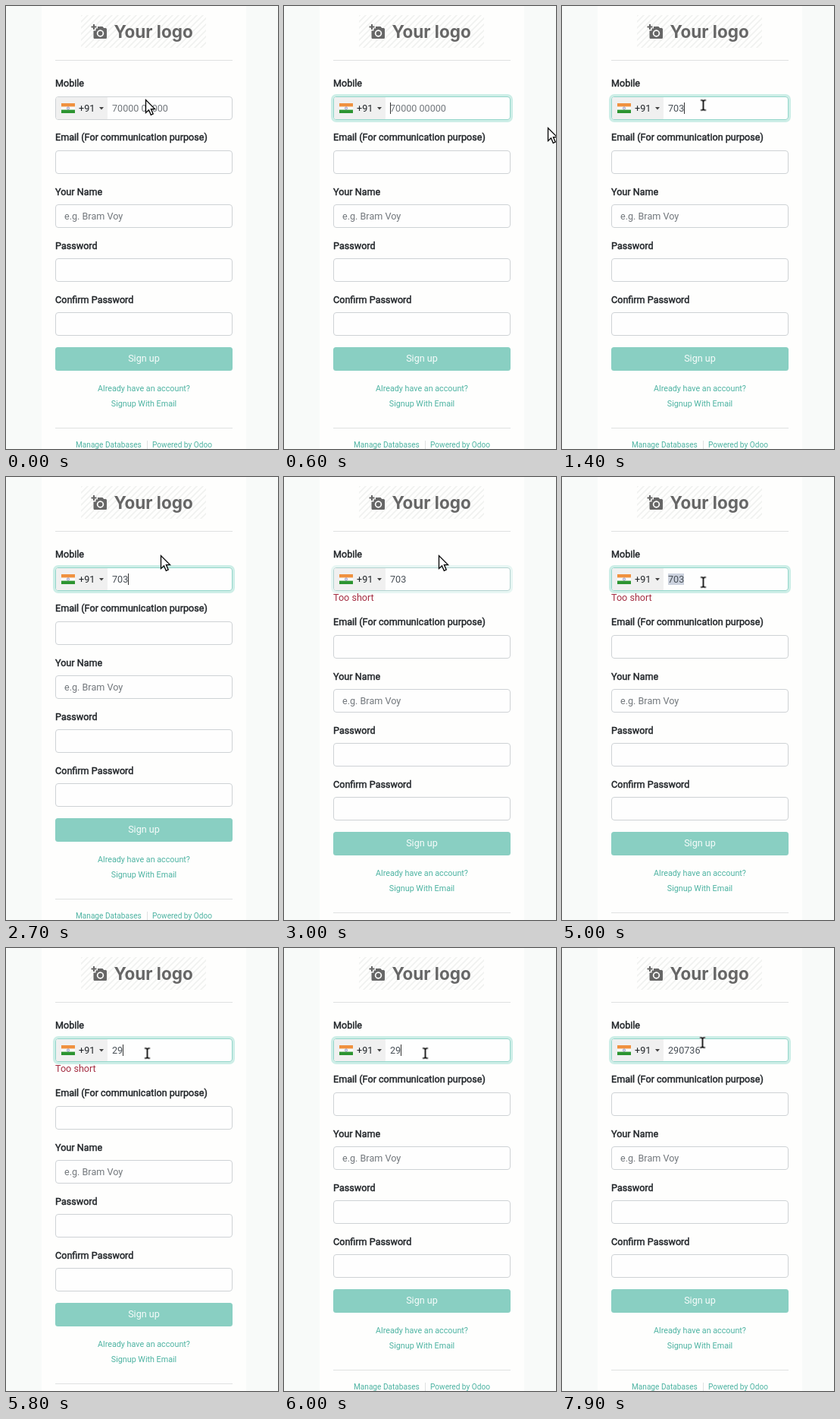
Write an HTML page that moves like this. It is 359x583 px and loops after 8 s.

```html
<!DOCTYPE html>
<html lang="en">
<head>
<meta charset="utf-8">
<title>Sign up form</title>
<style>
html, body { margin: 0; width: 100%; height: 100%; overflow: hidden; background: #f8faf9; }
body { position: relative; font: 12.6px Roboto, sans-serif; }
svg { position: absolute; left: 0; top: 0; width: 359px; height: 583px; }

.label { fill: #212529; stroke: #212529; stroke-width: .45px; }
.field { x: 65.5px; width: 233px; height: 30px; rx: 3.5px; fill: #fefefe; stroke: #ced2d5; }
.hint { fill: #72777c; }
.mid { text-anchor: middle; }
.link { fill: #4db3a2; font-size: 10.75px; }
.foot { fill: #4db3a2; font-size: 10.1px; }
.rule { stroke: #dfe1e1; }
.brand { font: 700 22.5px Inter, sans-serif; fill: #666; }

.entry { position: absolute; left: 140px; top: 127px; height: 15px; line-height: 15px; display: flex; color: #495057; }
.entry span { display: block; width: 0; overflow: hidden; white-space: nowrap; }
.entry i { width: 1px; height: 15px; background: #333; }

/* One 8 s clock, 1.25% per 100 ms */
.rest, .error, .ring, .placeholder, .first, .second, .caret, .pointer, .arrow, .beam {
  animation: 8s step-end -20ms infinite;
}
.rest { animation-name: push; }
.error { animation-name: warn; fill: #a52f43; }
.ring { animation-name: focus; }
.placeholder { animation-name: clear; }
.entry .first { animation-name: type-first; }
.entry .second { animation-name: type-second; }
.caret { animation-name: blink; }
.pointer { animation-name: move; }
.arrow { animation-name: arrow; }
.beam { animation-name: beam; }

@keyframes push {
  0%, 75%, 100% { transform: none; }
  37.5% { transform: translateY(18px); }
}
@keyframes warn {
  0%, 75%, 100% { visibility: hidden; }
  37.5% { visibility: visible; }
}
@keyframes focus {
  0%, 38.75% { opacity: 0; }
  5%, 37.5%, 56.25% { opacity: .45; }
  6.25%, 57.5%, 100% { opacity: 1; }
}
@keyframes clear {
  0% { visibility: visible; }
  15%, 100% { visibility: hidden; }
}
@keyframes type-first {
  0%, 71.25%, 100% { width: 0; background: none; }
  15% { width: 1ch; background: none; }
  16.25% { width: 2ch; background: none; }
  17.5% { width: 3ch; background: none; }
  62.5% { width: 3ch; background: #ccd2de; }
}
@keyframes type-second {
  0% { width: 0; }
  71.25% { width: 1ch; }
  72.5% { width: 2ch; }
  76.25% { width: 3ch; }
  82.5% { width: 4ch; }
  83.75% { width: 5ch; }
  86.25%, 100% { width: 6ch; }
}
@keyframes blink {
  0%, 8.75%, 25%, 37.5%, 62.5%, 98.75%, 100% { visibility: hidden; }
  5%, 15%, 32.5%, 56.25%, 71.25% { visibility: visible; }
}
@keyframes move {
  0% { transform: translate(184px, 123px); }
  1.25% { transform: translate(186.5px, 131px); }
  6.25% { transform: translate(262px, 146px); }
  7.5% { transform: translate(348px, 160px); }
  8.75% { transform: translate(186.5px, 131px); }
  12.5% { transform: translate(186.5px, 130.5px); }
  27.5% { transform: translate(196px, 104px); }
  28.75% { transform: translate(226px, 70px); }
  30% { transform: translate(258px, 44px); }
  31.25% { transform: translate(264px, 38px); }
  32.5% { transform: translate(232px, 74px); }
  33.75% { transform: translate(204px, 103px); }
  41.25% { transform: translate(203px, 98px); }
  42.5% { transform: translate(200px, 112px); }
  43.75% { transform: translate(193px, 140px); }
  45% { transform: translate(190px, 157px); }
  46.25% { transform: translate(187px, 146px); }
  47.5% { transform: translate(186.5px, 139.5px); }
  56.25% { transform: translate(186.5px, 138.5px); }
  98.75%, 100% { transform: translate(185.5px, 124.5px); }
}
@keyframes arrow {
  0%, 7.5%, 27.5%, 45% { visibility: visible; }
  1.25%, 8.75%, 43.75%, 46.25%, 100% { visibility: hidden; }
}
@keyframes beam {
  0%, 7.5%, 27.5%, 45% { visibility: hidden; }
  1.25%, 8.75%, 43.75%, 46.25%, 100% { visibility: visible; }
}
</style>
</head>
<body>
<svg viewBox="0 0 359 583">
  <defs>
    <pattern id="hatch" width="8" height="8" patternUnits="userSpaceOnUse">
      <path d="M-2 2L2 -2M0 8L8 0M6 10L10 6" stroke="#f0f1f0" stroke-width="1.6"/>
    </pattern>
  </defs>
  <rect x="47" width="270" height="583" fill="#fefefd"/>

  <rect x="99" y="12" width="165" height="43" fill="url(#hatch)"/>
  <g fill="#666">
    <path d="M115 24h2v2.500h2.500v2h-2.500v2.500h-2v-2.500h-2.500v-2h2.500z"/>
    <path fill-rule="evenodd" d="M121 27h6.500l1.700 2h2.300q1.500 0 1.500 1.500v11q0 1.500 -1.500 1.500h-14.500q-1.500 0 -1.500 -1.500v-9h3v-3h2.500z
      M124.500 31.300a4.700 4.700 0 1 0 .01 0z"/>
    <circle cx="124.500" cy="36" r="3"/>
  </g>
  <text class="brand" x="142.500" y="42">Your logo</text>
  <path class="rule" d="M65 71.500H299"/>

  <text class="label" x="65" y="106">Mobile</text>
  <rect class="field" y="119.500"/>
  <g class="ring">
    <rect x="63.500" y="117.500" width="237" height="34" rx="5.500" fill="none" stroke="#cdeee7" stroke-width="3"/>
    <rect class="field" y="119.500" style="stroke:#94d6ca"/>
  </g>
  <path d="M134 120H69q-3 0 -3 3v23q0 3 3 3H134z" fill="#f0f0f0"/>
  <rect x="73" y="128" width="18" height="13" fill="#fafafa"/>
  <rect x="73" y="128" width="18" height="4.400" fill="#f0913f"/>
  <rect x="73" y="136.600" width="18" height="4.400" fill="#2c9431"/>
  <circle cx="82" cy="134.500" r="1.500" fill="none" stroke="#6f73b5" stroke-width=".8"/>
  <text x="96" y="138.500" fill="#212529">+91</text>
  <path d="M123 133h6l-3 3.500z" fill="#444"/>
  <text class="hint placeholder" x="140" y="139">70000 00000</text>
  <text class="error" x="65" y="163">Too short</text>

  <g class="rest">
    <text class="label" x="65" y="177">Email (For communication purpose)</text>
    <rect class="field" y="190.500"/>
    <text class="label" x="65" y="249">Your Name</text>
    <rect class="field" y="261.500"/>
    <text class="hint" x="77" y="281">e.g. Bram Voy</text>
    <text class="label" x="65" y="320">Password</text>
    <rect class="field" y="332.500"/>
    <text class="label" x="65" y="391">Confirm Password</text>
    <rect class="field" y="403.500"/>
    <rect x="65" y="449" width="234" height="31" rx="3.500" fill="#89cfc2"/>
    <text class="mid" x="182" y="468" fill="#f7fcfb">Sign up</text>
    <text class="link mid" x="182" y="507">Already have an account?</text>
    <text class="link mid" x="182" y="527">Signup With Email</text>
    <path class="rule" d="M65 555.500H299M186.500 572V583"/>
    <text class="foot" x="92" y="581">Manage Databases</text>
    <text class="foot" x="193" y="581">Powered by Odoo</text>
  </g>
</svg>

<div class="entry"><span class="first">703</span><span class="second">290736</span><i class="caret"></i></div>

<svg viewBox="0 0 359 583">
  <g class="pointer">
    <path class="arrow" d="M.5 .5V17.500L4.500 13.800L7.300 20.300L10.200 19L7.400 12.600H12.500z" fill="#fff" stroke="#000" stroke-width="1.300"/>
    <g class="beam" fill="none">
      <path d="M-3.500 -6.500H-1.500L0 -5.500L1.500 -6.500H3.500M0 -5.500V5.500M-3.500 6.500H-1.500L0 5.500L1.500 6.500H3.500" stroke="#fff" stroke-width="3.400"/>
      <path d="M-3.500 -6.500H-1.500L0 -5.500L1.500 -6.500H3.500M0 -5.500V5.500M-3.500 6.500H-1.500L0 5.500L1.500 6.500H3.500" stroke="#000" stroke-width="1.700"/>
    </g>
  </g>
</svg>
</body>
</html>
```
